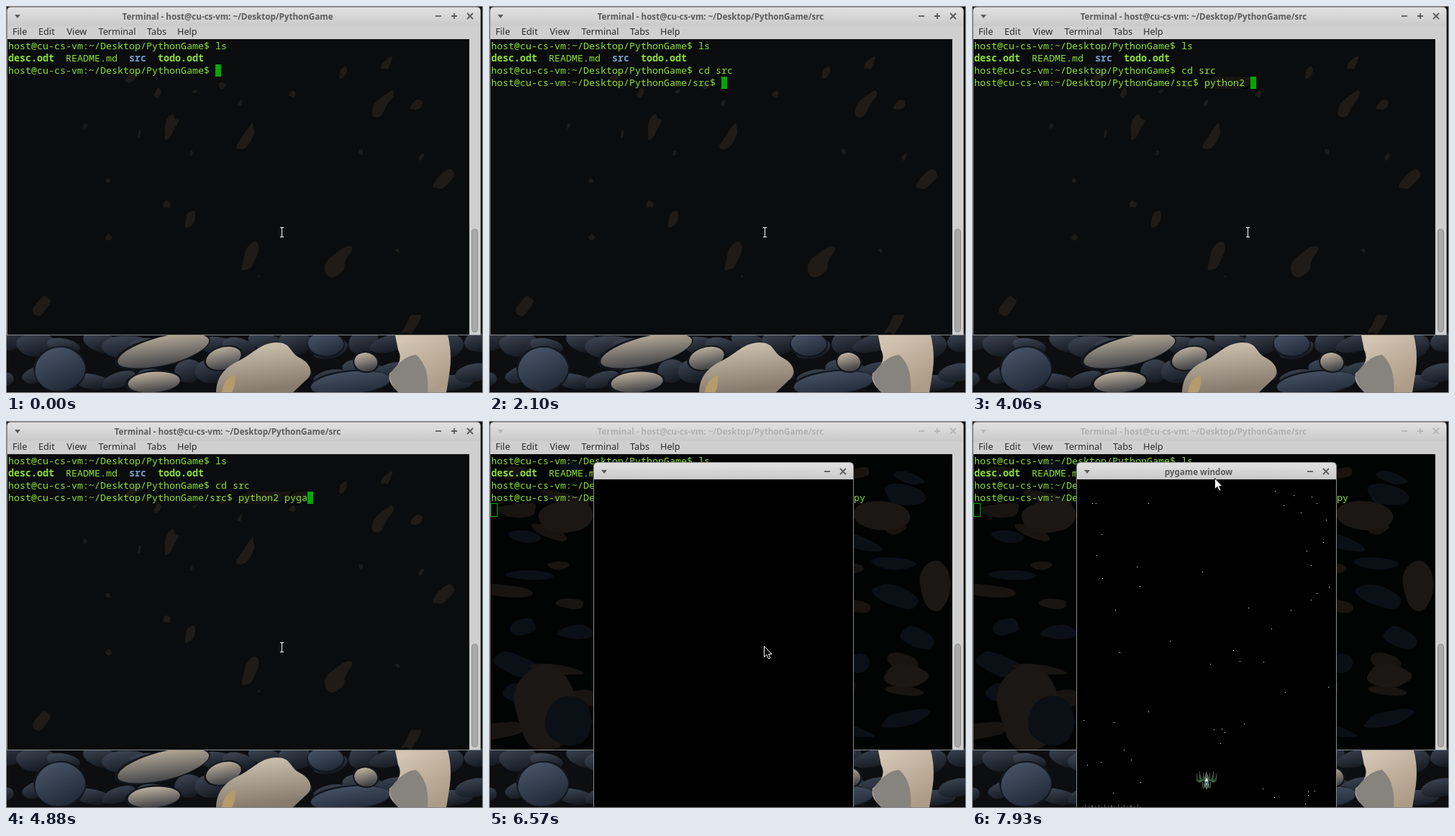
Animation of 663 by 537 pixels, one loop 8000 ms. Source, as an HTML page:

```html
<!DOCTYPE html>
<html lang="en">
<head>
<meta charset="utf-8">
<title>Terminal session</title>
<style>
html, body { margin: 0; width: 100%; height: 100%; overflow: hidden; background: #0c0e11; }
svg { display: block; width: 663px; height: 537px; }
text { white-space: pre; }
.mono { font: 13.333px "Noto Sans Mono", "DejaVu Sans Mono", monospace; fill: #8ae234; }
.bold { font-weight: bold; }
.folder { font-weight: bold; fill: #729fcf; }
.menu { font: 12.7px "Noto Sans", "Open Sans", sans-serif; fill: #2b2b2b; }
.title { font: bold 11.6px "Noto Sans", "Open Sans", sans-serif; fill: #5c5c5c; text-anchor: middle; }
.icons { fill: none; stroke: #5c5c5c; stroke-width: 1.8; }
.icons .solid { fill: #5c5c5c; stroke: none; }
.faded .title { fill: #b2b2b2; }
.faded .icons { stroke: #b6b6b6; }
.faded .icons .solid { fill: #b6b6b6; }
</style>
</head>
<body>
<svg id="stage" viewBox="0 0 663 537" xmlns="http://www.w3.org/2000/svg"></svg>
<script>
const LOOP = 8000, CELL = 8, ROW = 17, LEFT = 3, TOP = 47;
const HOST = "host@cu-cs-vm:";
const DIR = "~/Desktop/PythonGame";

// Keystrokes: time and the characters that appear
const cdKeys = [[0, ""], [1130, "cd "], [1390, "s"], [1530, "r"], [1830, "c"]];
const runKeys = [
  [2100, ""], [2630, "p"], [2760, "y"], [3020, "t"], [3140, "ho"], [3260, "n"], [3530, "2"],
  [4060, " "], [4490, "p"], [4620, "y"], [4760, "g"], [4880, "a"], [5140, "m"], [5390, "e_project.py"]
];
const SECOND = 2100, ENTER = 6320, OPEN = 6570;
const SCENE = 6720, STEP = 130, STEPS = 9, SPEED = 0.04;

const typed = (keys, t) => keys.filter(k => k[0] <= t).map(k => k[1]).join("");

function random(seed) {
  let s = seed * 48271 + 11;
  const next = () => (s = (s * 16807) % 2147483647) / 2147483647;
  next(); next();
  return (a = 0, b = 1) => a + (b - a) * next();
}

// Irregular closed outline around an ellipse
function blob(rnd, x, y, rx, ry, turn, rough) {
  const n = 9, c = Math.cos(turn), s = Math.sin(turn);
  const pts = Array.from({ length: n }, (_, i) => {
    const k = 1.08 + rnd(-rough, rough) / 2, p = i / n * 2 * Math.PI;
    const u = Math.cos(p) * rx * k, v = Math.sin(p) * ry * k;
    return [x + u * c - v * s, y + u * s + v * c];
  });
  const mid = i => {
    const p = pts[i % n], q = pts[(i + 1) % n];
    return `${((p[0] + q[0]) / 2).toFixed(1)} ${((p[1] + q[1]) / 2).toFixed(1)}`;
  };
  return `M${mid(0)}` + pts.map((_, i) => {
    const p = pts[(i + 1) % n];
    return `Q${p[0].toFixed(1)} ${p[1].toFixed(1)} ${mid(i + 1)}`;
  }).join("") + "Z";
}

const defs = [];
function gradient(from, to, x2 = 0, y2 = 1) {
  const id = "g" + defs.length;
  defs.push(`<linearGradient id="${id}" x2="${x2}" y2="${y2}"><stop offset=".15" stop-color="${from}"/><stop offset="1" stop-color="${to}"/></linearGradient>`);
  return `url(#${id})`;
}
const rect = (x, y, w, h, fill, more = "") =>
  `<rect x="${x}" y="${y}" width="${w}" height="${h}" fill="${fill}" ${more}/>`;
const path = (d, fill, more = "") => `<path d="${d}" fill="${fill}" ${more}/>`;
const label = (cls, x, y, s, more = "") => `<text class="${cls}" x="${x}" y="${y}" ${more}>${s}</text>`;
const line = (row, col, s, cls = "", more = "") =>
  label("mono " + cls, LEFT + col * CELL, TOP + 13 + row * ROW, s, more);

const bar = gradient("#dedede", "#c9c9c9");
const sand = gradient("#b9ad9a", "#45464a", .3);
const slate = gradient("#465265", "#232c3a", .5);
const pebble = gradient("#3a4350", "#171c24", .4);

function desktop() {
  const rnd = random(4);
  let art = "";
  for (let i = 0; i < 34; i++) {
    const x = i % 17 * 41 + rnd(-8, 8), y = (i < 17 ? 470 : 514) + rnd(-9, 9);
    art += path(blob(rnd, x, y, rnd(18, 32), rnd(10, 17), rnd(-.3, .3), .2), pebble);
  }
  const big = [
    [75, 504, 34, 30, 0, slate], [478, 523, 54, 15, -.1, slate], [444, 469, 24, 16, 0, slate],
    [302, 489, 25, 15, -.3, sand], [217, 479, 64, 19, -.23, sand],
    [205, 522, 36, 14, -.1, sand], [500, 494, 16, 13, .2, sand]
  ];
  for (const [x, y, rx, ry, turn, fill] of big) {
    art += path(blob(rnd, x, y, rx + 2, ry + 2, turn, .1), "#12161d") +
      path(blob(rnd, x, y, rx, ry, turn, .1), fill);
  }
  art += path("M292 537C292 515 304 502 322 493C345 482 351 469 374 467C397 466 393 480 408 488C424 496 429 510 416 520L398 537Z",
    gradient("#c8bcaa", "#867b6d", .2));
  art += path("M300 537Q302 517 318 512Q320 524 314 537Z", "#b59b6c");
  art += path("M541 457H614Q620 480 617 505L612 537H548Q530 525 533 510Q554 494 545 477Z",
    gradient("#d3c5b2", "#ac9c88", .6));
  art += path("M533 512Q550 486 570 484Q589 500 586 537H546Q535 527 533 512Z", "#87837d");
  return rect(0, 0, 663, 537, "#0c0e11") + art;
}

// Bright spots that show through the focused terminal: x, y, size
function flecks() {
  const rnd = random(8);
  const keys = [
    [177, 97, 13], [531, 78, 12], [524, 134, 18], [572, 137, 11], [228, 168, 16], [336, 180, 20],
    [255, 296, 13], [340, 350, 20], [460, 357, 22], [609, 241, 16], [48, 418, 18], [565, 442, 18]
  ];
  let d = keys.map(([x, y, r]) => blob(rnd, x, y, r * .45, r, rnd(.3, .9), .9)).join("");
  for (let i = 0; i < 16; i++) {
    d += blob(rnd, rnd(20, 640), rnd(85, 420), rnd(2, 5), rnd(2, 8), rnd(0, 1), .9);
  }
  return path(d, "#1e1b18");
}

// Stones that show through wherever the terminal has been redrawn
function dimStones() {
  const rnd = random(21);
  let art = "";
  for (let y = 70; y < 450; y += 44) {
    for (let x = 30; x < 650; x += 78) {
      art += path(blob(rnd, x + rnd(-25, 25), y + rnd(-12, 12), rnd(14, 38), rnd(6, 15), rnd(-.3, .4), .45),
        rnd() < .5 ? "#171412" : "#0b0f16");
    }
  }
  const keys = [[107, 133, 36, 22], [545, 132, 38, 20], [621, 228, 22, 34], [580, 353, 30, 15], [82, 398, 46, 54]];
  art += keys.map(([x, y, rx, ry]) => path(blob(rnd, x, y, rx, ry, 0, .3), "#1a1714")).join("");
  return art + path(blob(rnd, 110, 416, 32, 36, 0, .2), "#0b0f16");
}

const dash = (x, y) => path(`M${x - 4} ${y}h8`, "none");
const plus = (x, y) => path(`M${x - 4} ${y}h8M${x} ${y - 4}v8`, "none");
const cross = (x, y) => path(`M${x - 4} ${y - 4}l8 8m0 -8l-8 8`, "none");
const arrow = (x, y) => path(`M${x - 4} ${y - 2}h8l-4 5z`, "", 'class="solid"');

function terminal() {
  const menu = [["File", 9], ["Edit", 45], ["View", 84.5], ["Terminal", 128.5], ["Tabs", 196], ["Help", 238]];
  const prompt = `${HOST}${DIR}$`;
  return `<g id="frame">` +
    path("M1 457V7Q1 1 7 1H654Q660 1 660 7V457Z", "#8b8b8b") +
    path("M2 456V7Q2 2 7 2H654Q659 2 659 7V456Z", "#cfcfcf") +
    path("M2 28V7Q2 2 7 2H654Q659 2 659 7V28Z", bar) +
    label("title", 308, 19, "", 'id="title"') +
    `<g class="icons">${arrow(16, 14)}${dash(601, 14)}${plus(623, 14)}${cross(645, 14)}</g></g>` +
    menu.map(([s, x]) => label("menu", x, 40, s)).join("") +
    rect(647.5, 309.5, 8, 143, "#a9a9a9", 'rx="4" stroke="#8d8d8d"') +
    `<g clip-path="url(#screen)">${rect(2, 46, 642, 410, "#0b0c0d")}${flecks()}` +
    `<g clip-path="url(#redrawn)">${rect(2, 46, 642, 410, "#020303")}${dimStones()}</g></g>` +
    line(0, 0, prompt + " ls") +
    line(1, 0, "desc.odt", "bold") + line(1, 10, "README.md") +
    line(1, 21, "src", "folder") + line(1, 26, "todo.odt", "bold") +
    line(2, 0, prompt) + line(2, 36, "", "", 'id="first"') +
    `<g id="second">${line(3, 0, `${HOST}${DIR}/src$`)}${line(3, 40, "", "", 'id="command"')}</g>` +
    rect(0, 0, 8, 17, "#00aa00", 'id="cursor"') +
    rect(2.5, 114.5, 9, 18, "none", 'id="hollow" stroke="#00aa00"') +
    path("M381 307.5h5M383.5 307v14M381 320.5h5", "none", 'id="beam" stroke="#fff"');
}

function ship() {
  const half = path("M-2 20L-4 13L-9 17L-14 15V4L-12 12L-10 13V1L-7 11L-5 12V3L-3 10Z", "#28552f") +
    path("M-13.5 4v8M-9.5 1v9M-4.5 3v7", "none", 'stroke="#6a5a58" stroke-width=".8"') +
    path("M-11 15.5l7 -2M-5.5 16v8M-3.5 18v7", "none", 'stroke="#79857c" stroke-width=".8"');
  return `<g id="ship">${half}<g transform="scale(-1 1)">${half}</g>` +
    path("M0 1L3 10V22L0 27L-3 22V10Z", "#59645c") +
    path("M0 10l2 4l-2 7l-2 -7z", "#d9f0f4") +
    rect(-1, 15, 2, 3, "#2c7f9a") + `</g>`;
}

function game() {
  const rnd = random(30);
  let sky = "";
  for (let i = 0; i < 60; i++) sky += `M${Math.round(rnd(151, 500))} ${Math.round(rnd(84, 586))}h1v1h-1z`;
  const put = (x, y) => `<use href="#ship" x="${x}" y="${y}"/>`;
  return `<g id="game">` +
    path("M145 537V63Q145 57 151 57H501Q507 57 507 63V537Z", "#8b8b8b") +
    path("M146 81V63Q146 58 151 58H501Q506 58 506 63V81Z", bar) +
    `<g class="icons">${arrow(160, 70)}${dash(470, 70)}${cross(492, 70)}</g>` +
    rect(146, 81, 360, 456, "#000") +
    `<g id="scene">${label("title", 315, 75, "pygame window")}` +
    `<g clip-path="url(#view)">${path(sky, "#fff", 'id="sky" shape-rendering="crispEdges"')}</g>` +
    put(326, 485) + [0, 1, 2].map(i => put(167 + 27 * i, 531)).join("") + `</g>` +
    path("M0 0V15L3.5 11.8L6 17.5L8.5 16.4L6 11H10.5Z", "#000", 'id="pointer" stroke-linejoin="round"') + `</g>`;
}

const stage = document.getElementById("stage");
const scene = desktop() + terminal() + game() +
  rect(.5, .5, 662, 536, "none", 'stroke="#8a8a8a"');
stage.innerHTML = `<defs>${defs.join("")}${ship()}` +
  `<clipPath id="screen">${rect(2, 46, 642, 410, "#000")}</clipPath>` +
  `<clipPath id="view">${rect(146, 81, 360, 456, "#000")}</clipPath>` +
  `<clipPath id="redrawn"><rect id="patch"/></clipPath></defs>` + scene;

const el = {};
stage.querySelectorAll("[id]").forEach(e => el[e.id] = e);
const show = (e, on) => e.setAttribute("visibility", on ? "inherit" : "hidden");
const set = (e, attrs) => { for (const k in attrs) e.setAttribute(k, attrs[k]); };
const area = (x, y, width, height) => set(el.patch, { x, y, width, height });
const write = (e, s) => { if (e.textContent !== s) e.textContent = s; };

// The pointer glides up to the title bar during the last steps
function drawPointer(step) {
  const k = Math.max(0, (step - 5) / (STEPS - 5));
  const outside = step === STEPS;
  set(el.pointer, {
    transform: `translate(${Math.round(382 - 45 * k) + .5} ${Math.round(312 - 233 * k) + .5})`,
    fill: outside ? "#fff" : "#000",
    stroke: outside ? "#111" : "#fff"
  });
}

function render(t) {
  const inSrc = t >= SECOND, entered = t >= ENTER, open = t >= OPEN;
  const row = inSrc ? 3 : 2;
  const text = typed(inSrc ? runKeys : cdKeys, t);
  const start = LEFT + (inSrc ? 40 : 36) * CELL, y = TOP + row * ROW;
  const x = start + text.length * CELL;

  write(el.title, `Terminal - ${HOST} ${DIR}${inSrc ? "/src" : ""}`);
  write(el.first, typed(cdKeys, t));
  write(el.command, typed(runKeys, t));
  show(el.second, inSrc);
  set(el.cursor, entered ? { x: LEFT, y: y + ROW } : { x, y });
  show(el.cursor, !open);
  show(el.hollow, open);
  show(el.beam, !open);
  el.frame.setAttribute("class", open ? "faded" : "");

  if (open) area(2, 46, 642, 410);
  else if (entered) area(3, 98, 528, 34);
  else area(start, y, x + CELL - start, ROW);

  const step = Math.min(STEPS, Math.floor((t - SCENE) / STEP));
  show(el.game, open);
  show(el.scene, t >= SCENE);
  set(el.sky, { transform: `translate(0 ${Math.round((step - STEPS) * STEP * SPEED)})` });
  drawPointer(step);
}

const began = performance.now();
function loop() {
  render((performance.now() - began) % LOOP);
  requestAnimationFrame(loop);
}
render(0);
requestAnimationFrame(loop);
</script>
</body>
</html>
```
